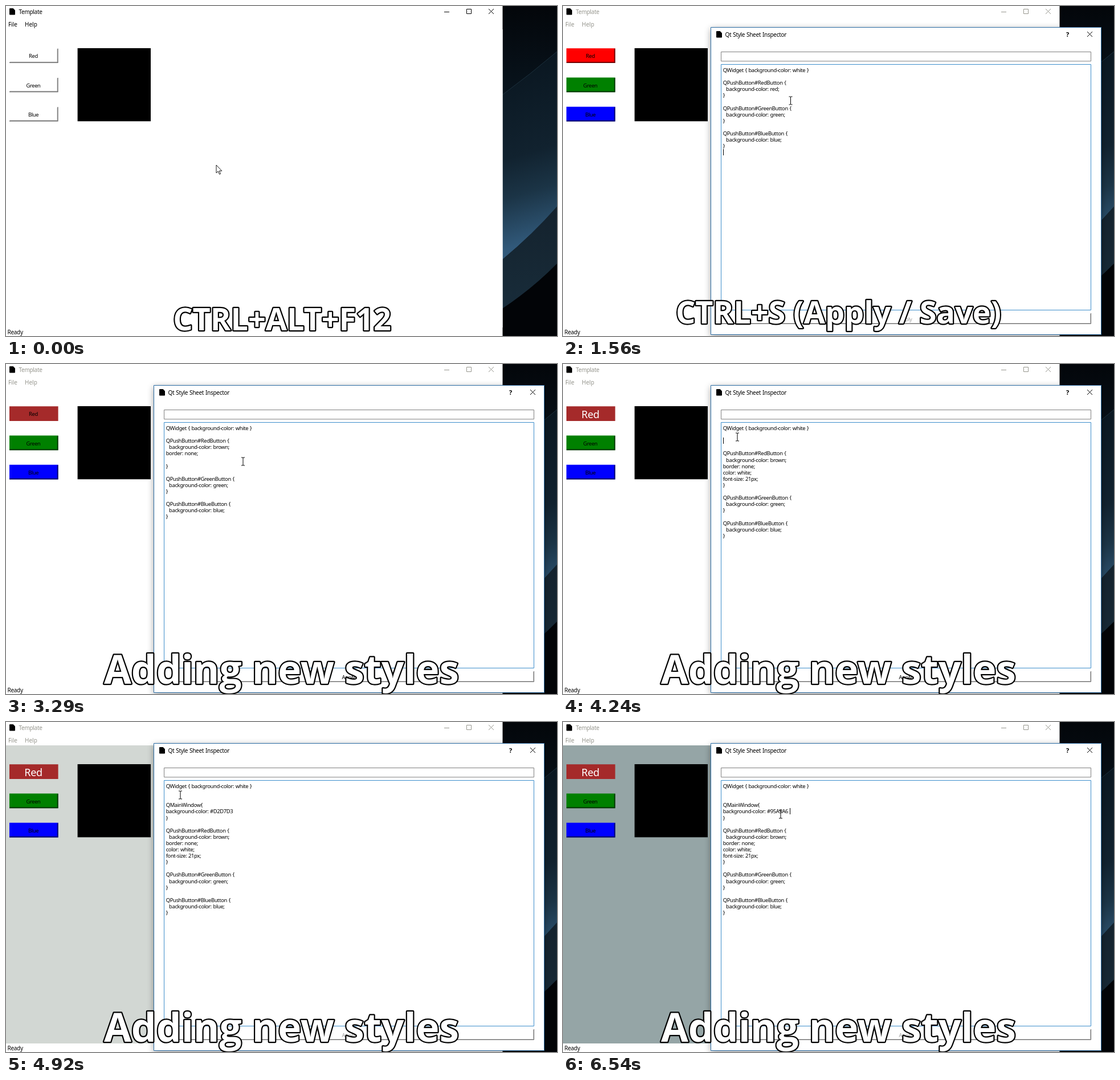
An HTML page that plays this animation: 967 px wide and 579 px high, repeating every 6.74 s.

```html
<!DOCTYPE html>
<html lang="en">
<head>
<meta charset="utf-8">
<title>Style sheet inspector</title>
<style>
  html, body { margin: 0; width: 100%; height: 100%; overflow: hidden; background: #fff; }
  svg { display: block; width: 100%; height: 100%; }
  text { font: 9.4px "Noto Sans", "Open Sans", sans-serif; letter-spacing: -.35px; word-spacing: .6px; white-space: pre; }
  .ui { font-size: 10px; letter-spacing: -.3px; }
  .menu { letter-spacing: 0; }
  .mid { text-anchor: middle; }
  .line { fill: none; stroke: currentColor; }
  #caption {
    font-family: "Open Sans", "Noto Sans", sans-serif; font-weight: 700; letter-spacing: 0; word-spacing: 0;
    fill: #fff; stroke: #000; stroke-width: 4.4px; stroke-linejoin: round; paint-order: stroke;
  }
</style>
</head>
<body>
<svg viewBox="0 0 967 579">
  <defs>
    <linearGradient id="sky" x1="0" y1="0" x2="0" y2="1">
      <stop offset="0" stop-color="#03060a"/>
      <stop offset=".25" stop-color="#08131c"/>
      <stop offset="1" stop-color="#0d1b26"/>
    </linearGradient>
    <linearGradient id="beam" gradientUnits="userSpaceOnUse" x1="880" y1="110" x2="967" y2="400">
      <stop offset="0" stop-color="#0a1721"/>
      <stop offset=".5" stop-color="#11222f"/>
      <stop offset=".72" stop-color="#1b3446"/>
      <stop offset="1" stop-color="#31597a"/>
    </linearGradient>
    <linearGradient id="band" x1="0" y1="0" x2="0" y2="1">
      <stop offset="0" stop-color="#14222d"/>
      <stop offset="1" stop-color="#182c3a"/>
    </linearGradient>
    <filter id="shadow" x="-10%" y="-10%" width="120%" height="120%">
      <feDropShadow dx="0" dy="3" stdDeviation="6" flood-opacity=".4"/>
    </filter>
    <path id="doc" d="M1 0H6.5L10 3.5V10.5Q10 11.5 9 11.5H1Q0 11.5 0 10.5V1Q0 0 1 0Z"/>
    <path id="cross" d="M-4.5-4.5 4.5 4.5M4.5-4.5-4.5 4.5"/>
  </defs>

  <g id="wallpaper">
    <path fill="url(#sky)" d="M871 0H967V579H871Z"/>
    <path fill="url(#beam)" d="M871 156Q920 120 967 80V352Q925 400 871 445Z"/>
    <path fill="none" stroke="#1c303d" d="M871 156Q920 120 967 80"/>
    <path fill="url(#band)" d="M871 445Q925 400 967 352V452Q925 495 871 531Z"/>
    <path fill="#020407" d="M871 531Q925 495 967 452V579H871Z"/>
  </g>

  <g id="main">
    <path fill="#fff" d="M0 0H871.5V579H0Z"/>
    <path id="mainBack" d="M0 41H871.5V564H0Z"/>
    <use href="#doc" x="6" y="4"/>
    <g id="chrome">
      <text class="ui" x="22.5" y="13.5" fill="currentColor">Template</text>
      <text class="ui menu" x="4" y="36" fill="currentColor">File</text>
      <text class="ui menu" x="33" y="36" fill="currentColor">Help</text>
      <path class="line" d="M769 10.5H778M808.5 5.5H816.5V13.5H808.5Z"/>
      <use class="line" href="#cross" x="851.5" y="9.5"/>
    </g>
    <path d="M125.6 74H254V202.3H125.6Z"/>
    <g id="buttons"></g>
    <text class="ui" x="2.5" y="576">Ready</text>
  </g>

  <g id="dialog">
    <path fill="#fff" filter="url(#shadow)" d="M259.5 37.5H944.5V576.5H259.5Z"/>
    <path fill="#fff" stroke="#2b6ca3" d="M259.5 37.5H944.5V576.5H259.5Z"/>
    <use href="#doc" x="269" y="44"/>
    <text class="ui" x="284.5" y="54">Qt Style Sheet Inspector</text>
    <text class="mid" style="font-size:11px;font-weight:700" x="885.5" y="53.5">?</text>
    <use class="line" href="#cross" x="924.5" y="49.5"/>
    <path fill="#fff" stroke="#7f7f7f" d="M277.5 80.5H926.5V96.8H277.5Z"/>
    <path fill="#fff" stroke="#3d8ecb" d="M277.5 102.5H926.5V533.5H277.5Z"/>
    <path class="line" color="#696969" d="M926.5 539V557.5H277"/>
    <path class="line" color="#c4c4c4" d="M925.5 540V556.5H278"/>
    <text id="apply" class="mid" x="601" y="553">Apply</text>
    <g id="code"></g>
    <path id="caret" stroke="#000" d="M.5 0V11"/>
  </g>

  <g id="pointer">
    <path id="arrow" fill="#fff" stroke="#000" stroke-width=".9" d="M0 0V14L3.2 11 5.6 16.3 7.6 15.4 5.3 10.3H9.8Z"/>
    <path id="beamCursor" class="line" color="#000" d="M-3-7H-1Q0-7 0-6Q0-7 1-7H3M0-6V6M-3 7H-1Q0 7 0 6Q0 7 1 7H3"/>
  </g>
  <text id="caption" class="mid"></text>
</svg>

<script>
const LOOP = 6740;
const LINE = 11.1;
const $ = id => document.getElementById(id);

function add(parent, tag, attrs, content = "") {
  const node = document.createElementNS("http://www.w3.org/2000/svg", tag);
  for (const key in attrs) node.setAttribute(key, attrs[key]);
  node.textContent = content;
  return parent.appendChild(node);
}

const captions = {
  open: ["CTRL+ALT+F12", 484.5, 569, 54],
  save: ["CTRL+S (Apply / Save)", 483.5, 557, 54],
  add: ["Adding new styles", 483.5, 561, 69.4]
};

const initial = {
  dialog: false, caption: "open", mouse: [369, 279], caret: null, canApply: false,
  rules: false, color: "red", extra: "", main: "",
  fills: ["#fff", "#fff", "#fff"], flat: false, label: "#000", labelSize: 9.4, back: "#fff"
};

const windowRule = (color, end = "\n}") => `\n\nQMainWindow{\nbackground-color: ${color}${end}\n`;
const border = "border: none;\n";
const white = border + "color: white;\n";
const brown = ["#a52a2a", "#008000", "#0000ff"];

// Each step changes part of the state at its time; a caret is [x, line].
const steps = [
  [490, { dialog: true, mouse: [399.5, 166] }],
  [810, { rules: true, canApply: true, caret: [281, 13] }],
  [1090, { caret: null }],
  [1320, { fills: ["#ff0000", "#008000", "#0000ff"], canApply: false }],
  [1560, { caption: "save", caret: [281, 13] }],
  [1720, { caret: [379, 3] }],
  [1830, { color: "br", canApply: true, caret: [371, 3] }],
  [1950, { color: "brown", caret: [389, 3] }],
  [2120, { caret: null }],
  [2430, { fills: brown, canApply: false }],
  [2570, { caret: [391, 3] }],
  [2900, { caption: "add", mouse: [416, 171], extra: "\n", canApply: true, caret: [281, 4] }],
  [2990, { extra: "bord\n", caret: [300, 4] }],
  [3080, { extra: "border: n\n", caret: [319, 4] }],
  [3160, { extra: border, caret: [338, 4] }],
  [3240, { flat: true, canApply: false }],
  [3290, { extra: border + "\n", canApply: true, caret: null }],
  [3340, { extra: border + "col\n", caret: [293, 5] }],
  [3450, { extra: border + "color: wh\n", caret: [318, 5] }],
  [3550, { extra: white, caret: [333, 5] }],
  [3600, { mouse: [423, 168], caret: null }],
  [3740, { label: "#fff", canApply: false }],
  [3810, { extra: white + "font-s\n", canApply: true, caret: [308, 6] }],
  [3890, { extra: white + "font-size: 21px;\n", caret: [347, 6] }],
  [3960, { labelSize: 18, canApply: false }],
  [4240, { mouse: [306, 128], main: "\n\n", canApply: true, caret: [281, 2] }],
  [4330, { main: "\n\nQMain\n", caret: [309, 3] }],
  [4410, { main: "\n\nQMainWindow{\n", caret: [344, 3] }],
  [4490, { main: "\n\nQMainWindow{\nbackground\n", caret: [331, 4] }],
  [4560, { main: windowRule("#D2", ""), caret: [377, 4] }],
  [4620, { main: windowRule("#D2D7D3", "\n"), caret: [281, 5] }],
  [4740, { main: windowRule("#D2D7D3"), back: "#d2d7d3", canApply: false, caret: [285, 5] }],
  [4920, { caret: null }],
  [5070, { main: windowRule("#DADFE1"), back: "#dadfe1", mouse: [441, 163] }],
  [5350, { main: windowRule("#ECECEC"), back: "#ececec", mouse: [385, 163] }],
  [5580, { caret: [398, 4] }],
  [5960, { main: windowRule("#95"), canApply: true, caret: [375, 4] }],
  [6040, { main: windowRule("#95A5"), caret: [386, 4] }],
  [6110, { main: windowRule("#95A5A6"), caret: [398, 4] }],
  [6180, { back: "#95a5a6", canApply: false, mouse: [382, 162], caret: null }],
  [6540, { caret: [398, 4] }]
];

const buttons = ["Red", "Green", "Blue"].map((name, i) => {
  const group = add($("buttons"), "g", { transform: `translate(6 ${74.2 + 51.3 * i})` });
  return {
    face: add(group, "path", { d: "M0 0H85.6V25.7H0Z" }),
    edge: add(group, "path", { class: "line", "stroke-width": 1.4, d: "M84.9 .5V25H0" }),
    bevel: add(group, "path", { class: "line", d: "M83.8 1.5V23.8H1", opacity: .35 }),
    label: add(group, "text", { class: "mid", x: 42 }, name)
  };
});

function styleSheet(s) {
  const head = "QWidget { background-color: white }\n";
  if (!s.rules) return head;
  const rule = (name, color, extra = "") =>
    `\nQPushButton#${name}Button {\n  background-color: ${color};\n${extra}}\n`;
  return head + s.main + rule("Red", s.color, s.extra) + rule("Green", "green") + rule("Blue", "blue");
}

function drawButton({ face, edge, bevel, label }, i, s) {
  const first = i === 0;
  const colored = s.fills[i] !== "#fff";
  const flat = first && s.flat;
  const size = first ? s.labelSize : 9.4;
  face.setAttribute("fill", s.fills[i]);
  for (const part of [edge, bevel]) {
    part.setAttribute("color", colored ? "rgba(0,0,0,.65)" : "#696969");
    part.setAttribute("display", flat ? "none" : "inline");
  }
  label.setAttribute("fill", first ? s.label : "#000");
  label.setAttribute("y", size > 10 ? 20.8 : 17);
  label.style.fontSize = size + "px";
}

function draw(s) {
  const show = (id, on) => $(id).setAttribute("display", on ? "inline" : "none");
  const move = (id, x, y) => $(id).setAttribute("transform", `translate(${x} ${y})`);

  $("mainBack").setAttribute("fill", s.back);
  $("chrome").setAttribute("color", s.dialog ? "#96968e" : "#000");
  buttons.forEach((button, i) => drawButton(button, i, s));

  show("dialog", s.dialog);
  $("apply").setAttribute("fill", s.canApply ? "#000" : "#a0a0a0");
  $("code").replaceChildren();
  styleSheet(s).split("\n").forEach((line, i) =>
    line && add($("code"), "text", { x: 280.7, y: 116 + LINE * i }, line));
  show("caret", s.caret);
  if (s.caret) move("caret", s.caret[0], Math.round(106.7 + LINE * s.caret[1]));

  show("arrow", !s.dialog);
  show("beamCursor", s.dialog);
  move("pointer", ...s.mouse);

  const [text, x, y, size] = captions[s.caption];
  const caption = $("caption");
  caption.textContent = text;
  caption.setAttribute("x", x);
  caption.setAttribute("y", y);
  caption.style.fontSize = size + "px";
}

let shown = -1;
function tick() {
  const time = performance.now() % LOOP;
  const past = steps.filter(([start]) => start <= time);
  if (past.length !== shown) {
    shown = past.length;
    draw(Object.assign({}, initial, ...past.map(([, change]) => change)));
  }
  requestAnimationFrame(tick);
}
tick();
</script>
</body>
</html>
```
